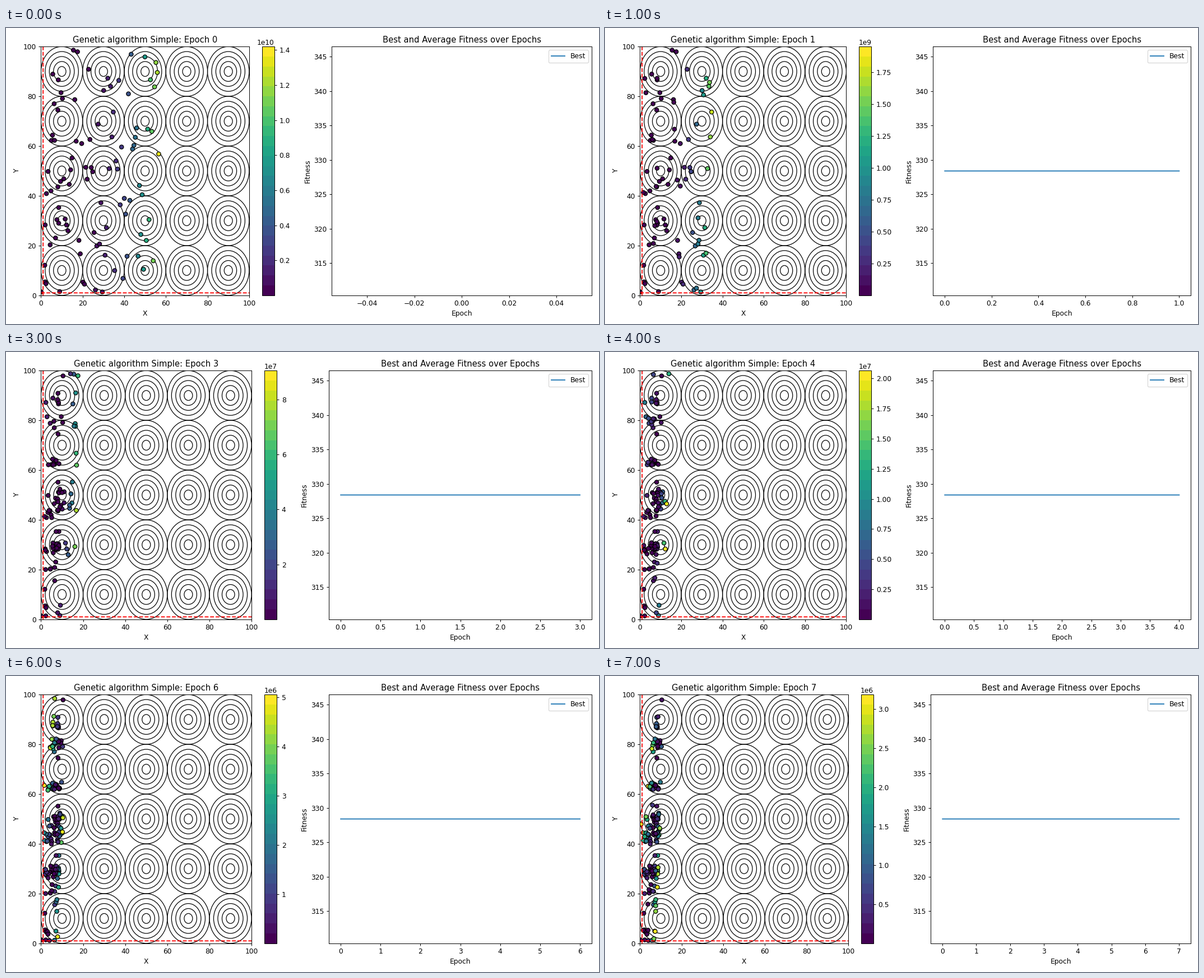
A matplotlib script for the animation above (8 s loop, 1058 px wide and 529 px high).

```python
import numpy as np
import matplotlib.pyplot as plt
from matplotlib.animation import FuncAnimation
from matplotlib.patches import Circle

W, H = 1058, 529
TOP, BOTTOM, LEFT, RIGHT = 33.2, 477.8, 62.45, 1045.3
BEST = 328.4

# Worst fitness that survives in each epoch
WORST = [1.42e10, 1.95e9, 3.97e8, 9.05e7, 2.065e7, 8.86e6, 5.05e6, 3.186e6]

# Fit individuals that live through every epoch
ELITE = [(8.1, 74.5), (5.5, 64.4), (6.5, 62.3), (9.4, 45.8), (8.1, 43.6),
         (3.4, 49.8), (4.8, 42), (2.6, 40.9), (8.5, 35.3), (8.5, 29),
         (2, 28.3), (4.4, 20.3), (1.8, 12.1), (2, 5.4), (2.4, 4.7), (0.1, 1.4)]
RANDOM_COUNT = 80
CHILDREN = 36


def fitness(pop):
    x, y = pop.T
    return BEST + 1350 * (y - x**2)**2 + (1 - x)**2


def evolve(seed=7):
    """Return the population of each epoch: select, then cross and mutate."""
    rng = np.random.default_rng(seed)
    start = np.column_stack([np.linspace(5, 57.2, RANDOM_COUNT),
                             rng.uniform(1, 99, RANDOM_COUNT)])
    pop = np.vstack([start, ELITE])
    epochs = []
    for limit in WORST:
        pop = pop[fitness(pop) <= limit]
        epochs.append(pop)
        children = np.column_stack([rng.choice(axis, CHILDREN) for axis in pop.T])
        children += rng.normal(0, 0.6, children.shape)
        pop = np.vstack([pop, np.clip(children, 0.2, 99)])
    return epochs


def place(ax, left, width):
    ax.set_position([left / W, 1 - BOTTOM / H, width / W, (BOTTOM - TOP) / H])


def arrange():
    """Share the width, leaving room for the longest colorbar label."""
    longest = max(len(label.get_text()) for label in bar.get_yticklabels())
    decimals = max(longest - 2, 0)
    cell = 469.5 - (0, 5.3, 9.5)[decimals]
    place(land, LEFT, 0.8 * cell)
    place(bar, LEFT + 0.849 * cell, (BOTTOM - TOP) / 20)
    place(chart, RIGHT - cell, cell)


populations = evolve()
fig = plt.figure(figsize=(12, 6), dpi=88.16667)
land, bar, chart = (fig.add_axes([0.1 + 0.3 * i, 0.1, 0.2, 0.84]) for i in range(3))

# Map of the population
for cx in range(10, 100, 20):
    for cy in range(10, 100, 20):
        for r in range(2, 11, 2):
            land.add_patch(Circle((cx, cy), r, fill=False, ec="black", lw=1))
dots = land.scatter([], [], c=[], cmap=plt.get_cmap("viridis", 25),
                    vmin=BEST, vmax=WORST[0], edgecolors="black", linewidths=1)
land.axvline(1, color="red", ls="--", snap=False)
land.axhline(1, color="red", ls="--", snap=False)
land.set(xlim=(0, 100), ylim=(0, 100), xlabel="X", ylabel="Y")
fig.colorbar(dots, cax=bar)

# Fitness chart
best_line, = chart.plot([], [], label="Best", snap=False)
chart.set(ylim=(BEST * 0.945, BEST * 1.055), xlabel="Epoch", ylabel="Fitness",
          title="Best and Average Fitness over Epochs")
chart.legend(loc="upper right")


def update(epoch):
    pop = populations[epoch]
    dots.set_offsets(pop)
    dots.set_array(fitness(pop))
    dots.set_clim(BEST, WORST[epoch])
    land.set_title(f"Genetic algorithm Simple: Epoch {epoch}")
    arrange()

    best_line.set_data([0, epoch], [BEST, BEST])
    margin = 0.05 * epoch or 0.055
    chart.set_xlim(-margin, epoch + margin)
    return dots, best_line


anim = FuncAnimation(fig, update, frames=len(WORST), interval=1000,
                     repeat=True, repeat_delay=0, blit=False)
plt.show()
```
